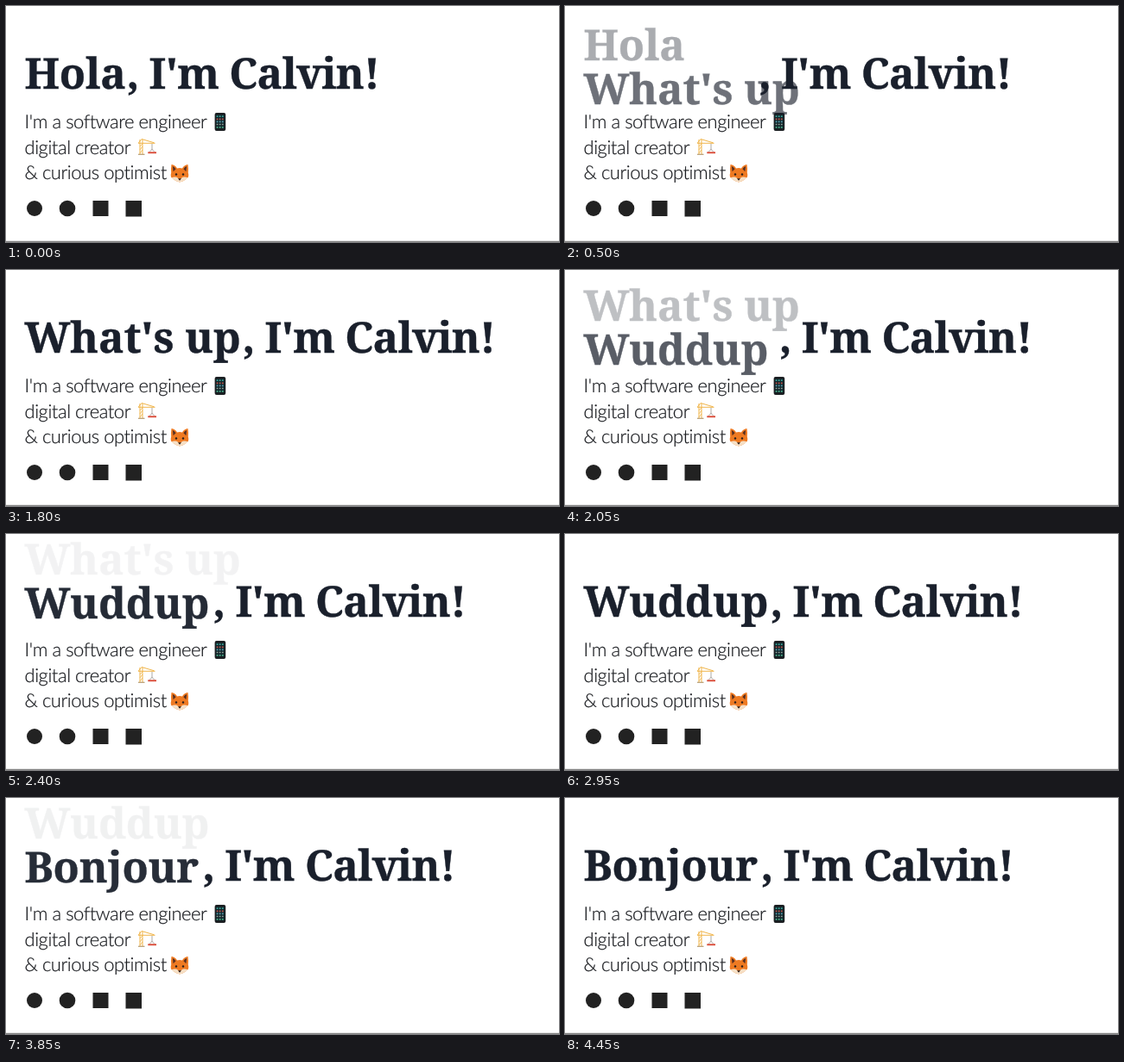
These frames come from a looping animation (640x274 px, 4720 ms). An HTML page:

```html
<!DOCTYPE html>
<html lang="en">
<head>
<meta charset="utf-8">
<title>Greeting</title>
<style>
  html, body { margin: 0; width: 100%; height: 100%; overflow: hidden; background: #fff; }
  svg { display: block; width: 100%; height: 100%; }
  text { white-space: pre; text-rendering: geometricPrecision; }
  .head { font: 700 49.5px "Noto Serif", serif; letter-spacing: -0.2px; fill: #1a202c; stroke: #1a202c; stroke-width: .4px; }
  .lead { font: 300 22px Lato, sans-serif; letter-spacing: -0.45px; fill: #1a1c20; stroke: #1a1c20; stroke-width: .2px; }
  #rest { letter-spacing: -0.8px; }
</style>
</head>
<body>
<svg viewBox="0 0 640 274">
  <g class="lead">
    <text x="21.5" y="142">I'm a software engineer</text>
    <text x="21.5" y="171.5">digital creator</text>
    <text x="21.5" y="201">&amp; curious optimist</text>
  </g>

  <g id="phone">
    <rect x="241.6" y="124" width="12.6" height="21" rx="2" fill="#1c1f22"/>
    <rect x="242.9" y="126.3" width="10" height="16" fill="#10262b"/>
    <g stroke-width="1.7" stroke-dasharray="1.7 1.4">
      <path d="M243.7 128.2h8.5" stroke="#3fa79b"/>
      <path d="M243.7 131.3h8.5" stroke="#c9574f"/>
      <path d="M243.7 134.4h8.5" stroke="#5aa2b4"/>
      <path d="M243.7 137.5h8.5" stroke="#9aa39c"/>
      <path d="M243.7 140.8h8.5" stroke="#4fb28a"/>
    </g>
  </g>

  <g id="crane" fill="none">
    <path d="M153 159.3H172.5M155 155V172M158 155V172M153.3 158.8L157 154.5L171.5 158.8" stroke="#f0b54a"/>
    <path d="M155 163l3-3M155 167l3-4M155 171l3-4" stroke="#f0b54a" stroke-width=".8"/>
    <path d="M169 160V167M169 166.5l-3.2 3M169 166.5l3.2 3" stroke="#8b8580" stroke-width=".7"/>
    <path d="M164.3 170.3H174" stroke="#d8432f" stroke-width="1.8"/>
    <path d="M153 172.3H160.5" stroke="#b59a70" stroke-width="1.2"/>
  </g>

  <g id="fox">
    <path d="M191.5 184q4.5 .5 6.5 4.5q3-1 6 0q2-4 6.5-4.5q1 6 .3 9.5q1.2 4-.6 6q-4 4-9.2 5q-5.2-1-9.2-5q-1.8-2-.6-6q-.7-3.5 .3-9.5z" fill="#ee7a22"/>
    <path d="M192.8 186q2.5 1 3.8 3.3l-3 3zM209.2 186q-2.5 1-3.8 3.3l3 3z" fill="#5a3020"/>
    <path d="M191.6 199.2q5-1.5 7.4 .5l2 1.5l2-1.5q2.4-2 7.4-.5q-4.2 4.3-9.4 5.3q-5.2-1-9.4-5.3z" fill="#f6e0c6"/>
    <path d="M199 200.3h4l-2 2.5z" fill="#2a1d1a"/>
    <circle cx="197" cy="195.5" r="1.2" fill="#2a1d1a"/>
    <circle cx="205" cy="195.5" r="1.2" fill="#2a1d1a"/>
  </g>

  <g fill="#222">
    <circle cx="33" cy="235" r="9"/>
    <circle cx="71" cy="235" r="9.3"/>
    <rect x="100.5" y="226" width="18" height="18"/>
    <rect x="138.5" y="226" width="18.5" height="18.5"/>
  </g>
  <rect y="272.8" width="640" height="1.2" fill="#858585"/>

  <g class="head">
    <text class="word" x="21.5" y="95.5">Hola</text>
    <text class="word" x="21.5" y="95.5">What's up</text>
    <text class="word" x="21.5" y="95.5">Wuddup</text>
    <text class="word" x="21.5" y="95.5">Bonjour</text>
    <text id="rest" x="139.8" y="95.5">, I'm Calvin!</text>
  </g>
</svg>
<script>
  const LOOP = 4720, STEP = 50, LAST = 4450;
  const START = 330, EVERY = 1500, LINE = 51;
  const shifts = [0, 134, 98, 87];   // where the rest of the line sits after each word
  // quick move with a slow tail: [ms since the swap began, part still to go]
  const decay = [[0, 1], [35, .91], [70, .73], [120, .49], [170, .37], [220, .28],
                 [270, .2], [370, .08], [570, .05], [820, .012], [950, 0]];
  const words = [...document.querySelectorAll(".word")];
  const rest = document.getElementById("rest");

  function progress(ms) {
    if (ms <= 0) return 0;
    const i = decay.findIndex(p => p[0] >= ms);
    if (i < 0) return 1;
    const [a, u] = decay[i - 1], [b, v] = decay[i];
    return 1 - (u + (v - u) * (ms - a) / (b - a));
  }

  function draw(time) {
    const t = Math.min(LAST, Math.floor((time % LOOP + 10) / STEP) * STEP);
    const swaps = shifts.slice(1).map((_, i) => progress(t - START - i * EVERY));
    let x = 0;
    words.forEach((word, i) => {
      const come = i ? swaps[i - 1] : 1;
      const go = i < swaps.length ? swaps[i] : 0;
      if (i) x += (shifts[i] - shifts[i - 1]) * come;
      word.setAttribute("transform", `translate(0 ${LINE * (1 - come - go)})`);
      word.setAttribute("opacity", come * (1 - go));
    });
    rest.setAttribute("transform", `translate(${x} 0)`);
  }

  const begin = performance.now();
  function tick() {
    draw(performance.now() - begin);
    requestAnimationFrame(tick);
  }
  draw(0);
  requestAnimationFrame(tick);
</script>
</body>
</html>
```
